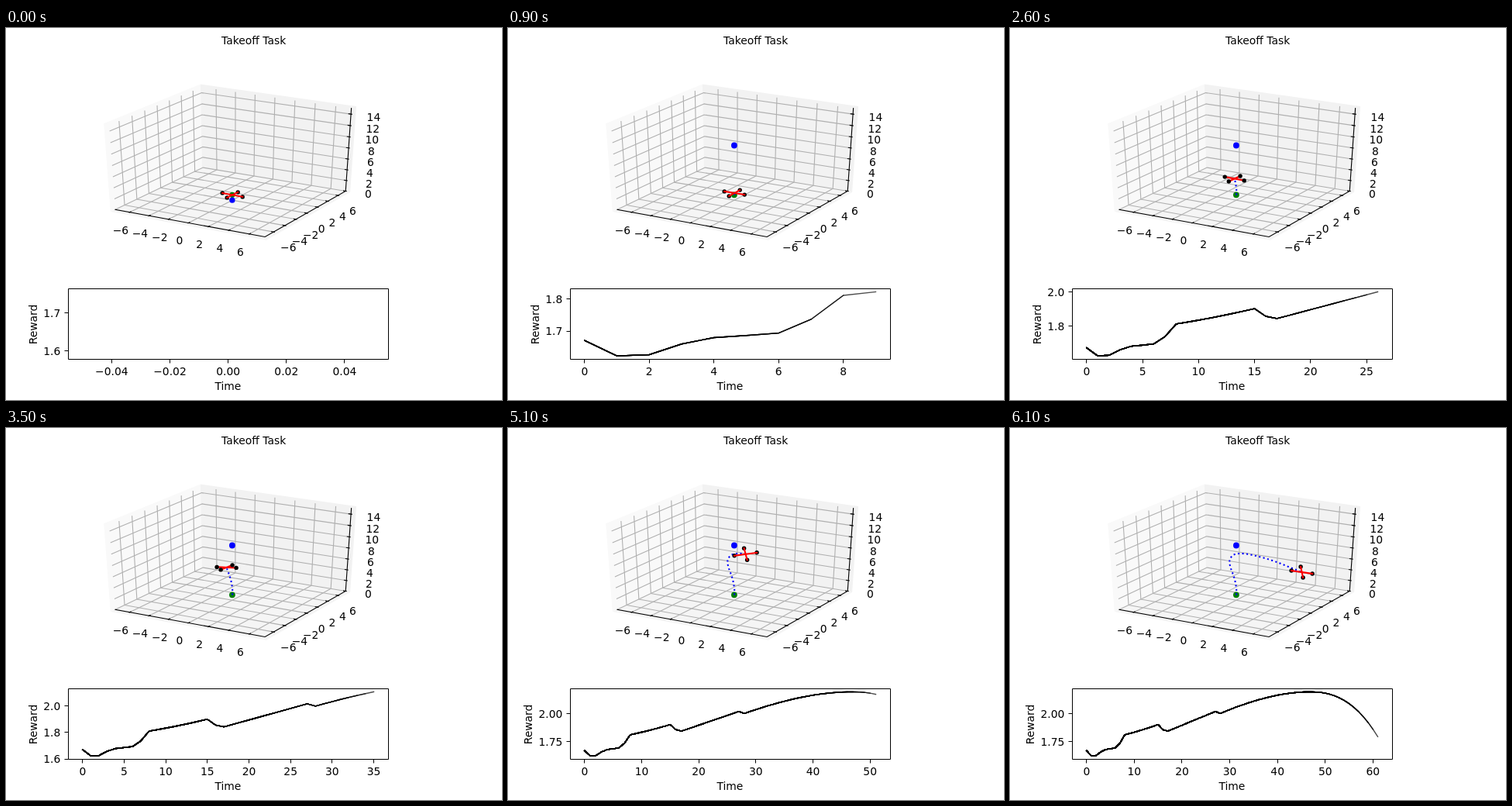
Recreate the animation shown at these times as an HTML page. Size 640 by 480 pixels, loop 6.2 s.

```html
<!DOCTYPE html>
<html lang="en">
<head>
<meta charset="utf-8">
<title>Takeoff Task</title>
<style>
  html, body { margin: 0; width: 640px; height: 480px; overflow: hidden; background: #fff; }
  svg { display: block; }
  text { font: 13.89px "DejaVu Sans", sans-serif; text-anchor: middle; }
  .end { text-anchor: end; }
</style>
</head>
<body>
<svg width="640" height="480" viewBox="0 0 640 480">
  <g id="space"></g>
  <g id="flight"></g>
  <g id="chart"></g>
  <text x="319.7" y="21">Takeoff Task</text>
  <text x="286.4" y="467">Time</text>
</svg>
<script>
const STEP = 100, COUNT = 62;
const $ = id => document.getElementById(id);
const range = (a, b, s = 1) => Array.from({ length: Math.floor((b - a) / s) + 1 }, (_, i) => a + i * s);
const pt = p => p[0].toFixed(2) + ',' + p[1].toFixed(2);
const poly = (pts, attrs) => `<polyline fill="none" points="${pts.map(pt).join(' ')}" ${attrs}/>`;
const face = (pts, fill) => `<polygon points="${pts.map(pt).join(' ')}" fill="${fill}"/>`;
const dot = ([x, y], r, fill) => `<circle cx="${x.toFixed(2)}" cy="${y.toFixed(2)}" r="${r}" fill="${fill}"/>`;
const label = (x, y, s, attrs = '') => `<text x="${x.toFixed(2)}" y="${y.toFixed(2)}" ${attrs}>${String(s).replace('-', '\u2212')}</text>`;

// Perspective view of a unit cube centred on the origin
function project(x, y, z) {
  const s = Math.sqrt(3) / 2;
  const a = s * x + y / 2;
  const b = -x / 4 + s / 2 * y + s * z;
  const w = 10 - (s / 2 * x - 0.75 * y + z / 2);
  return [291.9 + 2230 * a / w, 169.6 - 1245 * b / w];
}
const height = z => project(0, 0, z / 15 - 0.5);

function drawSpace() {
  const e = 0.5 + 1 / 48, h = 0.5, out = h + 1 / 120, inn = h - 1 / 60;
  const P = project;
  const grid = 'stroke="#b0b0b0" stroke-width="1.11" stroke-linejoin="round"';
  const ink = 'stroke="#000" stroke-width="1.11" stroke-linecap="square"';
  const tick = 'stroke="#000" stroke-width="1.11"';
  let lines = '', marks = '', names = '';
  const add = (wall, mark, at, dx, dy, name) => {
    lines += poly(wall, grid);
    marks += poly(mark, tick);
    names += label(at[0] + dx, at[1] + dy + 5, name);
  };
  for (const v of range(-6, 6, 2)) {
    const q = v / 15;
    add([P(q, -h, -h), P(q, h, -h), P(q, h, h)], [P(q, -out, -h), P(q, -inn, -h)],
      P(q, -h, -h), -11.6, 23, v);
    add([P(h, q, -h), P(-h, q, -h), P(-h, q, h)], [P(out, q, -h), P(inn, q, -h)],
      P(h, q, -h), 19, 20, v);
  }
  for (const v of range(0, 14, 2)) {
    const q = v / 15 - h;
    add([P(-h, -h, q), P(-h, h, q), P(h, h, q)], [P(out, h, q), P(inn, h, q)],
      P(h, h, q), 29.3, 4, v);
  }
  $('space').innerHTML =
    face([P(-e, -e, -e), P(-e, e, -e), P(-e, e, e), P(-e, -e, e)], '#f9f9f9') +
    face([P(-e, e, -e), P(e, e, -e), P(e, e, e), P(-e, e, e)], '#f2f2f2') +
    face([P(-e, -e, -e), P(e, -e, -e), P(e, e, -e), P(-e, e, -e)], '#f5f5f5') +
    lines + poly([P(-h, -h, -h), P(h, -h, -h), P(h, h, -h), P(h, h, h)], ink) + marks + names;
}

// step, centre x y, half of the long arm, half of the short arm
const poses = [
  [0, 292.2, 215.4, 13, 2.5, 7, -3.5],
  [9, 292.2, 213, 13, 2.1, 7, -3.9],
  [17, 292, 206.5, 13, 2.5, 7, -3.5],
  [26, 289.7, 194.5, 12.5, 2.4, 7.4, -3.5],
  [35, 284.6, 179.9, 12.5, 0.5, 7.5, -3],
  [40, 283.3, 172.5, 13, -0.5, 6, -4.5],
  [43, 284.6, 167.5, 13.5, -1, 4, -5.7],
  [47, 291, 162.6, 14.2, -1.8, 0.8, -7],
  [51, 306.6, 162.8, 14.5, -2, -2, -7.5],
  [56, 337, 170.5, 14, 0.2, -2, -7.4],
  [61, 376.6, 186, 13.5, 2, -1.5, -7]
];
const slope = (i, k) => {
  const a = poses[Math.max(i - 1, 0)], b = poses[Math.min(i + 1, poses.length - 1)];
  return (b[k] - a[k]) / (b[0] - a[0]);
};
function pose(n) {
  const i = Math.min(poses.findLastIndex(p => p[0] <= n), poses.length - 2);
  const a = poses[i], b = poses[i + 1], d = b[0] - a[0], t = (n - a[0]) / d;
  return range(1, 6).map(k => {
    const u = t * t * (3 - 2 * t);
    return a[k] + (b[k] - a[k]) * u +
      d * t * (1 - t) * ((1 - t) * slope(i, k) - t * slope(i + 1, k));
  });
}
const track = range(0, COUNT - 1).map(n => pose(n).slice(0, 2));

function drawFlight(n) {
  const [x, y, ax, ay, bx, by] = pose(n);
  const tips = [[x - ax, y - ay], [x + ax, y + ay], [x - bx, y - by], [x + bx, y + by]];
  const red = 'stroke="#f00" stroke-width="2.08" stroke-linecap="square"';
  const arms = poly(tips.slice(0, 2), red) + poly(tips.slice(2), red);
  const rotors = tips.map(p => dot(p, 2.7, '#000')).join('');
  $('flight').innerHTML =
    dot(height(1), n ? 3.9 : 3.6, '#008000') +
    poly(track.slice(0, n + 1), 'stroke="#00f" stroke-width="2.08" stroke-dasharray="2.08 3.44"') +
    (n > 20 && n < 45 ? arms + rotors : rotors + arms) +
    dot(height(n ? 10 : 0), n ? 3.9 : 3.6, '#00f');
}

const opening = [1.671, 1.623, 1.627, 1.66, 1.68, 1.6865, 1.694, 1.7365];
function reward(n) {
  if (n < 8) return opening[n];
  if (n < 16) return 1.811 + 0.0105 * (n - 8) + 0.00034 * (n - 8) ** 2;
  if (n < 17) return 1.856;
  if (n < 28) return 1.843 + 0.01745 * (n - 17);
  const d = Math.abs(n - 47);
  return 2.1915 - (n < 47 ? 0.00066 * d ** 2 - 6.8e-6 * d ** 3 : 0.0011 * d ** 2 + 6.65e-5 * d ** 3);
}
const rewards = range(0, COUNT - 1).map(reward);

// Axis limits with a 5% margin; a single value is widened first
function limits(lo, hi) {
  if (lo === hi) {
    const w = lo ? lo * 0.05 : 0.05;
    lo -= w;
    hi += w;
  }
  const m = (hi - lo) * 0.05;
  return [lo - m, hi + m];
}

// Round tick values: the smallest nice step within the bin count giving two ticks or more
function ticks([lo, hi], bins) {
  const raw = (hi - lo) / bins, mag = 10 ** Math.floor(Math.log10(raw));
  const steps = [0.1, 0.2, 0.25, 0.5, 1, 2, 2.5, 5, 10].map(s => s * mag);
  let i = steps.findIndex(s => s >= raw - 1e-12), ks, step;
  do {
    step = steps[i--];
    const a = Math.ceil(lo / step), b = Math.floor(hi / step);
    ks = b < a ? [] : range(a, b);
  } while (ks.length < 2 && i >= 0);
  let digits = 0;
  while (Math.abs(step * 10 ** digits - Math.round(step * 10 ** digits)) > 1e-6) digits++;
  return { digits, values: ks.map(k => k * step) };
}

function drawChart(n) {
  const L = 80, W = 413.3, T = 336.3, H = 91;
  const seen = rewards.slice(0, n + 1);
  const xl = limits(0, n), yl = limits(Math.min(...seen), Math.max(...seen));
  const px = v => L + W * (v - xl[0]) / (xl[1] - xl[0]);
  const py = v => T + H * (yl[1] - v) / (yl[1] - yl[0]);
  const snap = v => Math.round(v - 0.5) + 0.5;
  const xt = ticks(xl, 9), yt = ticks(yl, 3);
  const line = seen.map((v, i) => [px(i), py(v)]);
  let s = '', marks = '';
  // The curve is laid down once more at every step, so older parts look heavier
  for (let m = 1; m <= n; m++) {
    s += poly(line.slice(0, m + 1),
      'stroke="#000" stroke-opacity=".7" stroke-width="1.39" stroke-linejoin="round" stroke-linecap="square"');
  }
  for (const v of xt.values) {
    marks += `M${snap(px(v))} 427.5v5`;
    s += label(px(v), 448, v.toFixed(xt.digits));
  }
  for (const v of yt.values) {
    marks += `M80.5 ${snap(py(v))}h-5`;
    s += label(70.3, py(v) + 5.2, v.toFixed(yt.digits), 'class="end"');
  }
  s += `<path d="M80.5 336.5h413v91h-413z${marks}" fill="none" stroke="#000"/>`;
  const x = 40 - 8.84 * (yt.digits - 1);
  s += `<text transform="translate(${x} 382.5) rotate(-90)">Reward</text>`;
  $('chart').innerHTML = s;
}

let shown = -1;
function tick() {
  const n = Math.floor(performance.now() / STEP) % COUNT;
  if (n !== shown) {
    shown = n;
    drawFlight(n);
    drawChart(n);
  }
  requestAnimationFrame(tick);
}
drawSpace();
tick();
</script>
</body>
</html>
```
